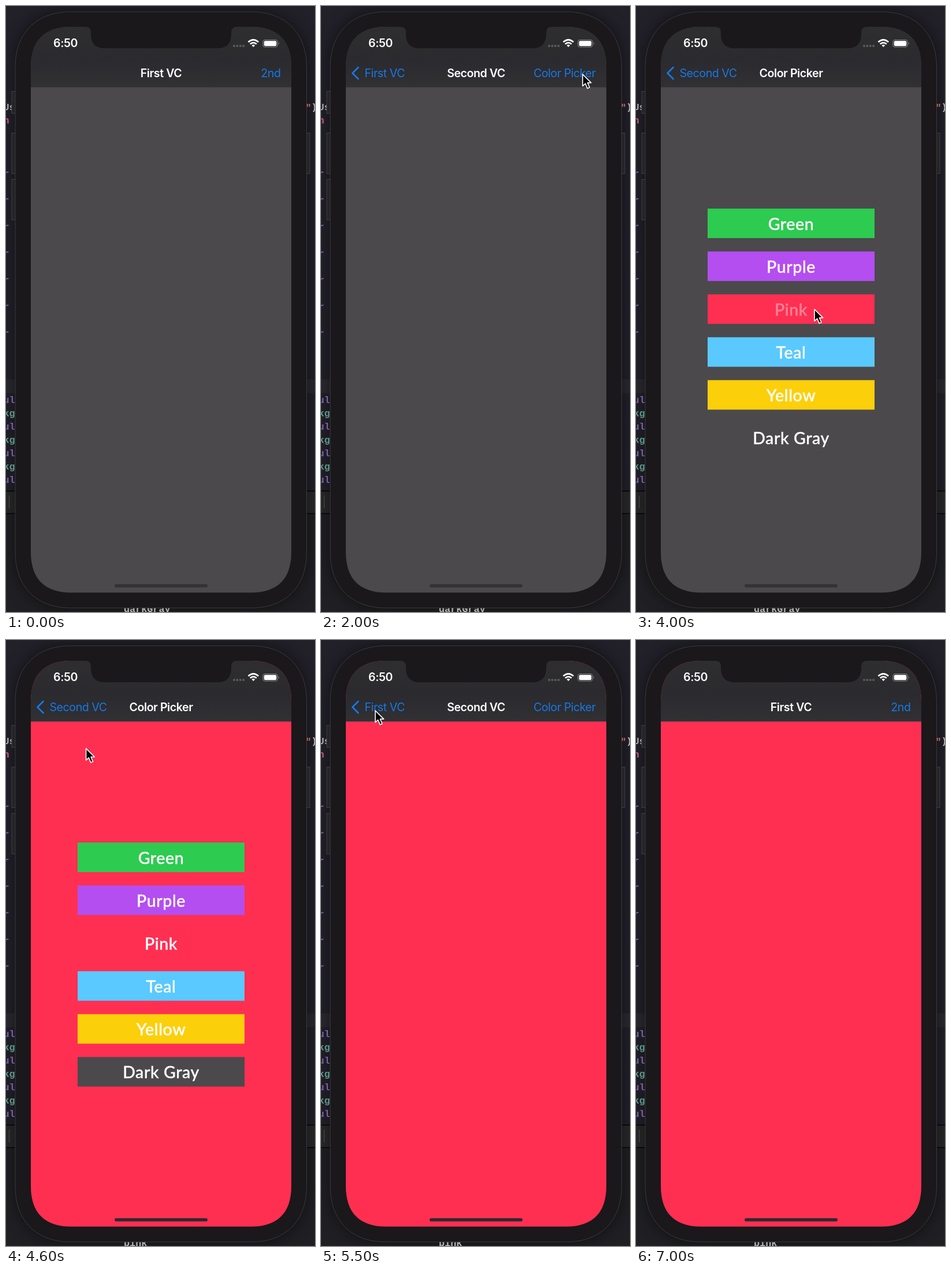
These frames come from a looping animation (535 by 1047 pixels, 7.1 s). An HTML page:

```html
<!DOCTYPE html>
<html lang="en">
<head>
<meta charset="utf-8">
<title>Colour picker navigation</title>
<style>
  html, body { margin: 0; width: 100%; height: 100%; overflow: hidden; background: #1c1b20; }
  svg { display: block; width: 100vw; height: 100vh; }
  .ui { font: 400 19.6px Inter, Roboto, sans-serif; letter-spacing: -.45px; }
  .title { font-weight: 600; fill: #fff; text-anchor: middle; }
  .link { fill: #1479e8; }
  .end { text-anchor: end; }
  .label { font: 500 28.5px Lato, sans-serif; letter-spacing: .6px; fill: #fff; stroke: #fff; stroke-width: .4; text-anchor: middle; }
  .code { font: 700 16.8px "Liberation Mono", "DejaVu Sans Mono", monospace; }
</style>
</head>
<body>
<svg id="stage" viewBox="0 0 535 1047" preserveAspectRatio="none">
  <defs>
    <linearGradient id="barFill" x1="0" y1="0" x2="0" y2="1">
      <stop offset="0" stop-color="#2e2d2f"/>
      <stop offset=".55" stop-color="#2b2a2e"/>
      <stop offset="1" stop-color="#313033"/>
    </linearGradient>
    <filter id="blur" x="-20%" y="-20%" width="140%" height="140%"><feGaussianBlur stdDeviation="14"/></filter>
    <clipPath id="screenClip"><path id="screenShape"/></clipPath>
    <clipPath id="barClip"><rect x="43" y="90" width="451" height="50"/></clipPath>
  </defs>

  <rect width="535" height="1047" fill="#22212a"/>
  <rect y="645" width="535" height="24" fill="#2a292f"/>
  <rect y="837" width="535" height="41" fill="#0d0c0e"/>
  <rect y="839" width="535" height="37" fill="#29282a"/>
  <rect y="878" width="535" height="169" fill="#201f23"/>
  <rect x="16" y="10" width="505" height="1030" rx="85" opacity=".5" filter="url(#blur)"/>
  <path d="M5.5 846V868" stroke="#4a494c"/>
  <g id="code" class="code"></g>
  <text id="console" class="code" x="204" y="1046.5" fill="#b5b4b7"></text>
  <g fill="#242326" stroke="#403f42">
    <rect x="10" y="147.500" width="12" height="38"/>
    <rect x="10" y="219.500" width="12" height="70"/>
    <rect x="10" y="299.500" width="12" height="70"/>
    <rect x="514" y="219.500" width="12" height="70"/>
  </g>
  <path id="body" fill="#1a181a" stroke="#3b3a3d"/>

  <g clip-path="url(#screenClip)">
    <g id="pages"></g>
    <rect x="43" y="36" width="451" height="105" fill="url(#barFill)"/>
    <path d="M43 140.500H494" stroke="#3e3d40"/>
    <g id="bar" class="ui" clip-path="url(#barClip)">
      <path id="chevron" d="M64.500 106L54.500 116L64.500 126" fill="none" stroke="#1479e8" stroke-width="2.700" stroke-linecap="round" stroke-linejoin="round"/>
    </g>
    <rect id="home" x="188" y="999" width="161" height="5.600" rx="2.800"/>
    <path d="M137 35V36Q147 36 147 45V49C147 65 156 73 171 73H366C381 73 390 65 390 49V45Q390 36 400 36V35Z" fill="#1a181a"/>
    <text class="ui title" x="103" y="71.300">6:50</text>
    <g id="dots" fill="#5a595c"></g>
    <g fill="none" stroke="#fff" stroke-width="2.700">
      <path d="M419.500 62.300Q428.300 54.300 437.100 62.300"/>
      <path d="M422.800 65.700Q428.300 60.900 433.800 65.700"/>
    </g>
    <path d="M425.500 68Q428.300 65.500 431.100 68L428.300 71Z" fill="#fff"/>
    <rect x="445" y="58.500" width="25" height="12.500" rx="3.600" fill="none" stroke="#858487" stroke-width="1.200"/>
    <rect x="446.800" y="60.300" width="21.400" height="8.900" rx="2.200" fill="#fff"/>
    <path d="M471.800 62.500Q474 64.700 471.800 67Z" fill="#858487"/>
  </g>
  <path id="cursor" d="M0 0V20.300L4.700 16L8.200 24.300L12 22.700L8.500 14.600H14.700Z" stroke="#fff" stroke-width="1.600" stroke-linejoin="round"/>
</svg>

<script>
const LOOP = 7100, WIDTH = 451, MID = 268.5;
const GRAY = '#4b494c', PINK = '#ff2f52';
const PICK = 4150, PRESS = 3850;
const PUSHES = [1100, 2200], POPS = [4860, 5750];

const $ = id => document.getElementById(id);

function add(parent, tag, attrs, text) {
  const el = document.createElementNS('http://www.w3.org/2000/svg', tag);
  for (const key in attrs) el.setAttribute(key, attrs[key]);
  if (text) el.textContent = text;
  parent.appendChild(el);
  return el;
}

// Rounded box whose corners span c pixels, with handles of fraction h.
function softBox(x, y, w, h, c, handle) {
  const k = c * handle, r = x + w, b = y + h;
  return `M${x + c} ${y}H${r - c}c${k} 0 ${c} ${c - k} ${c} ${c}V${b - c}` +
    `c0 ${k} ${k - c} ${c} ${-c} ${c}H${x + c}c${-k} 0 ${-c} ${k - c} ${-c} ${-c}V${y + c}` +
    `c0 ${-k} ${c - k} ${-c} ${c} ${-c}Z`;
}
$('body').setAttribute('d', softBox(16, 10, 504.5, 1030, 96, .62));
$('screenShape').setAttribute('d', softBox(43, 36, WIDTH, 977.5, 70, .66));

// Editor text peeking out beside the phone
const code = (text, y, fill, x = -4.5) => add($('code'), 'text', { x, y: y + 5, fill }, text);
code('Us', 175, '#a5a4a9');
code('n', 198, '#c4577f');
code('"', 176, '#c9675b', 518.5);
code(')', 175, '#b5b4b9', 528.5);
for (let i = 0; i < 7; i++) code('r', 290 + i * 46, '#7a5da6');
for (let i = 0; i < 7; i++) code(i % 2 ? 'kg' : 'ul', 681 + i * 23, i % 2 ? '#5c9588' : '#7a5da6');

for (let i = 0; i < 4; i++) add($('dots'), 'circle', { cx: 395 + i * 5.4, cy: 69, r: 2.1 });

const titles = ['First VC', 'Second VC', 'Color Picker'];
const actions = ['2nd', 'Color Picker', ''];
const swatches = [
  ['Green', '#2dcb50'], ['Purple', '#b44ef0'], ['Pink', PINK],
  ['Teal', '#5ac9ff'], ['Yellow', '#fccf0b'], ['Dark Gray', GRAY]
];

const pages = titles.map((name, i) => {
  const view = add($('pages'), 'g', {});
  const fill = add(view, 'rect', { x: 43, y: 36, width: WIDTH, height: 978 });
  const labels = i < 2 ? [] : swatches.map(([text, color], n) => {
    const y = 350 + n * 74.1;
    add(view, 'rect', { x: 124, y, width: 289, height: 51, fill: color });
    return add(view, 'text', { x: MID, y: y + 36.7, class: 'label' }, text);
  });
  const shade = add(view, 'rect', { x: 43, y: 36, width: WIDTH, height: 978 });
  const item = (text, x, cls) => add($('bar'), 'text', { x, y: 123, class: cls }, text);
  return {
    view, fill, shade, labels,
    title: item(name, MID, 'title'),
    back: item(i ? titles[i - 1] : '', 75.5, 'link'),
    action: item(actions[i], 475.5, 'link end')
  };
});

const clamp = v => Math.max(0, Math.min(1, v));
const smooth = s => s * s * (3 - 2 * s);
const easeIn = s => s * s;
const easeOut = s => s * (2 - s);

// Critically damped slide from 0 to 1
function slide(t, start) {
  if (t < start) return 0;
  const k = (t - start) * .0145;
  const left = (1 + k) * Math.exp(-k);
  return left < .002 ? 1 : 1 - left;
}

const route = [
  [450, 570, 250],
  [950, 453, 118, easeOut],
  [2750, 453, 118, smooth],
  [3650, 309, 524, smooth],
  [4200, 309, 524, smooth],
  [4600, 139, 188, easeIn],
  [4800, 94, 122, easeOut],
  [6450, 94, 122, smooth],
  [6800, 70, -40, easeIn]
];

function cursorAt(t) {
  const n = route.findIndex(p => p[0] > t);
  if (n < 1) return [-60, -60];
  const a = route[n - 1], b = route[n];
  const s = b[3]((t - a[0]) / (b[0] - a[0]));
  return [a[1] + (b[1] - a[1]) * s, a[2] + (b[2] - a[2]) * s];
}

function place(el, x, opacity) {
  el.setAttribute('transform', `translate(${x.toFixed(2)} 0)`);
  el.setAttribute('opacity', opacity.toFixed(3));
}

function draw(t) {
  const sum = starts => starts.reduce((total, s) => total + slide(t, s), 0);
  const depth = sum(PUSHES) - sum(POPS);
  const picked = t >= PICK;

  pages.forEach((page, i) => {
    const u = depth - i, size = Math.abs(u);
    const shift = Math.pow(size, 1.2);
    const alpha = clamp(1 - 1.8 * Math.max(0, size - .05));
    place(page.view, u < 0 ? size * WIDTH : -u * WIDTH * .3, 1);
    page.view.setAttribute('visibility', size < 1 ? 'visible' : 'hidden');
    page.fill.setAttribute('fill', picked ? PINK : GRAY);
    page.shade.setAttribute('opacity', .1 * clamp(u));
    place(page.title, shift * (u < 0 ? 170 : -143), alpha);
    place(page.back, shift * (u < 0 ? 143 : -110), alpha);
    place(page.action, 0, alpha);
  });

  const held = t >= PRESS && t < PICK;
  const pinkAlpha = held ? .4 : picked ? .4 + .6 * clamp((t - PICK) / 250) : 1;
  pages[2].labels[2].setAttribute('opacity', pinkAlpha);
  $('chevron').setAttribute('opacity', clamp(depth));
  $('home').setAttribute('fill', picked ? '#2d2a2d' : '#333235');
  $('console').textContent = picked ? 'pink' : 'darkGray';

  const [x, y] = cursorAt(t);
  $('cursor').setAttribute('transform', `translate(${x.toFixed(2)} ${y.toFixed(2)})`);
}

const begin = performance.now();
function tick() {
  draw((performance.now() - begin) % LOOP);
  requestAnimationFrame(tick);
}
tick();
</script>
</body>
</html>
```
